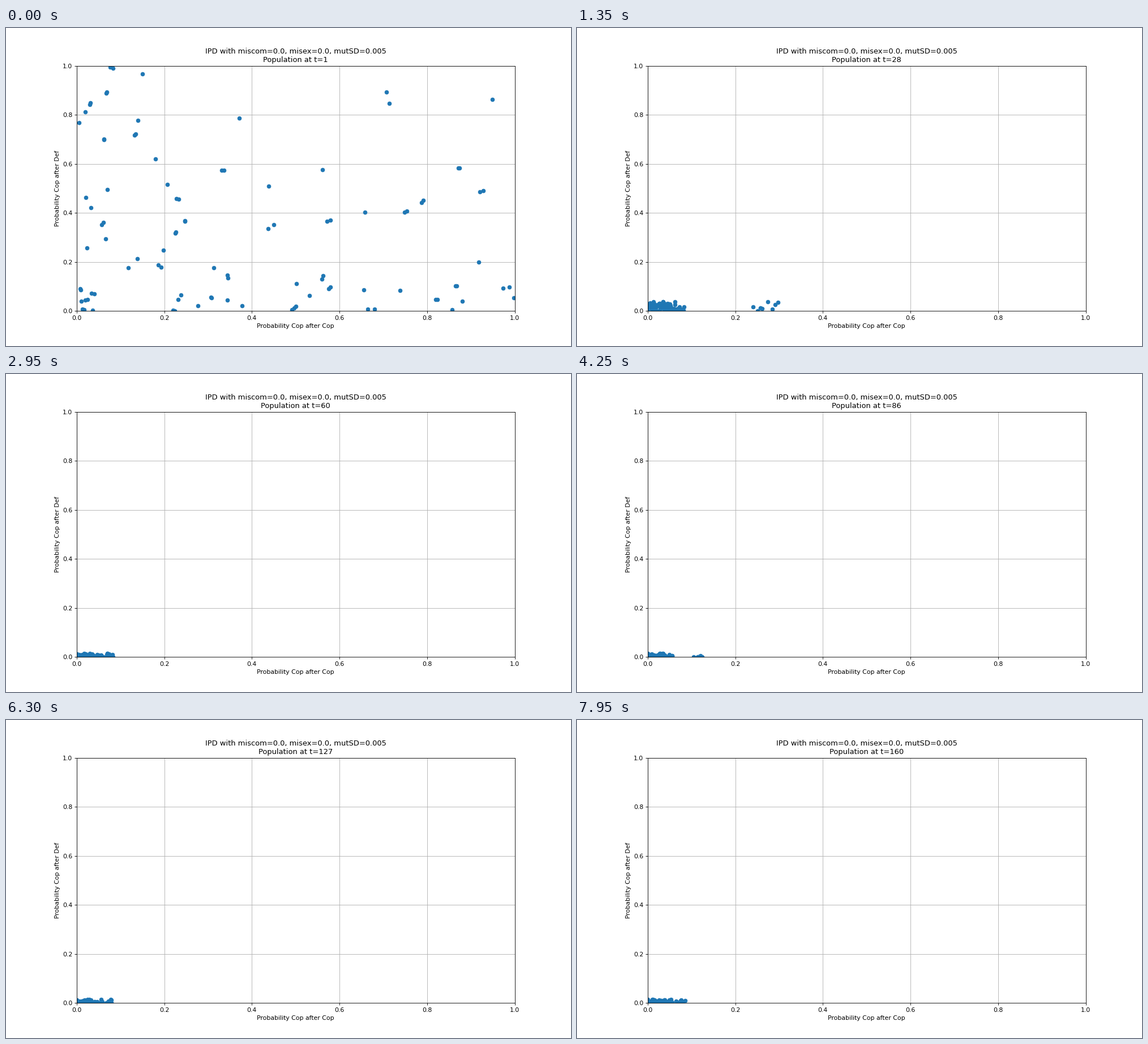
These frames come from a looping animation (998x561 px, 8 s). A matplotlib script:

```python
import numpy as np
import matplotlib.pyplot as plt
from matplotlib.animation import FuncAnimation

W, H, DPI = 998, 561, 78
STEPS, N, PARENTS = 160, 100, 68
FOUNDERS = [(.04, .07), (.277, .021), (.5, .02)]
rng = np.random.default_rng(11)


def first_generation():
    """Random strategies, denser near (0, 0), plus close relatives of some."""
    wild = rng.random((PARENTS, 2)) ** (1.4, 1.5)
    kin = wild[:N - PARENTS - len(FOUNDERS)]
    kin = kin + rng.normal(0, .007, kin.shape)
    return np.clip(np.concatenate([wild, kin, FOUNDERS]), 0, 1)


def drift(keep=.85):
    """Slow random walk of every dot around its lineage."""
    z = rng.normal(size=(N, 2))
    walk = [z]
    for _ in range(STEPS - 1):
        z = keep * z + np.sqrt(1 - keep ** 2) * rng.normal(size=(N, 2))
        walk.append(z)
    return np.clip(walk, -2.1, 2.1)


def ramp(t, start, end):
    return np.clip((t - start) / (end - start), 0, 1)


def lineages(t):
    """Rows of share, centre x, centre y, spread x, spread y."""
    grow = ramp(t, 0, 16)
    young = np.exp(-max(t - 16, 0) / 10)
    stray = np.exp(-((t - 86) / 12) ** 2)
    right = .2 * (1 - ramp(t, 16, 24))
    mid = .3 * (1 - ramp(t, 16, 33))
    tail = .12 * ramp(t, 16, 28) * (1 - .6 * stray)
    return np.array([
        (1 - right - mid - tail, .020 + .021 * young, .004 + .043 * young,
         .017 * grow, .005 + .016 * young),
        (tail, .072 + .040 * stray, .004 * (1 - stray),
         .007, .006 - .004 * stray),
        (mid, .268, .010, .022 * grow, .013 * grow),
        (right, .510, .007, .018 * grow, .009 * grow),
    ])


first = first_generation()
noise = drift()
draw = (rng.permutation(N) + .5) / N
# The most cooperative strategies die out first
rank = np.argsort(np.argsort(first @ (.1, 1))) / (N - 1)
death = 2 + 9 * (1 - rank) ** 2.5


def population(t):
    if t == 1:
        return first
    rows = lineages(t)
    pick = np.searchsorted(np.cumsum(rows[:, 0]), draw)
    mine = rows[np.minimum(pick, len(rows) - 1)]
    z = noise[t - 1]
    born = mine[:, 1:3] + mine[:, 3:5] * z
    old = first + .005 * (z - noise[0])
    return np.clip(np.where((t < death)[:, None], old, born), 0, 1)


fig, ax = plt.subplots(figsize=((W + 1e-6) / DPI, (H + 1e-6) / DPI), dpi=DPI)
# Margins of a 12.8 x 7.2 inch sheet, cut to whole pixels
fw, fh = 12.8 * DPI / W, 7.2 * DPI / H
fig.subplots_adjust(left=.125 * fw, right=.9 * fw,
                    bottom=.11 * fh, top=.88 * fh)
ax.set(xlim=(0, 1), ylim=(0, 1),
       xlabel="Probability Cop after Cop", ylabel="Probability Cop after Def")
ax.grid(True)
dots, = ax.plot([], [], "o", color="C0")
title = ax.set_title("\n")


def update(i):
    t = i + 1
    dots.set_data(*population(t).T)
    title.set_text("IPD with miscom=0.0, misex=0.0, mutSD=0.005\n"
                   f"Population at t={t}")
    return dots, title


anim = FuncAnimation(fig, update, frames=STEPS, interval=50,
                     repeat=True, repeat_delay=0)
plt.show()
```
